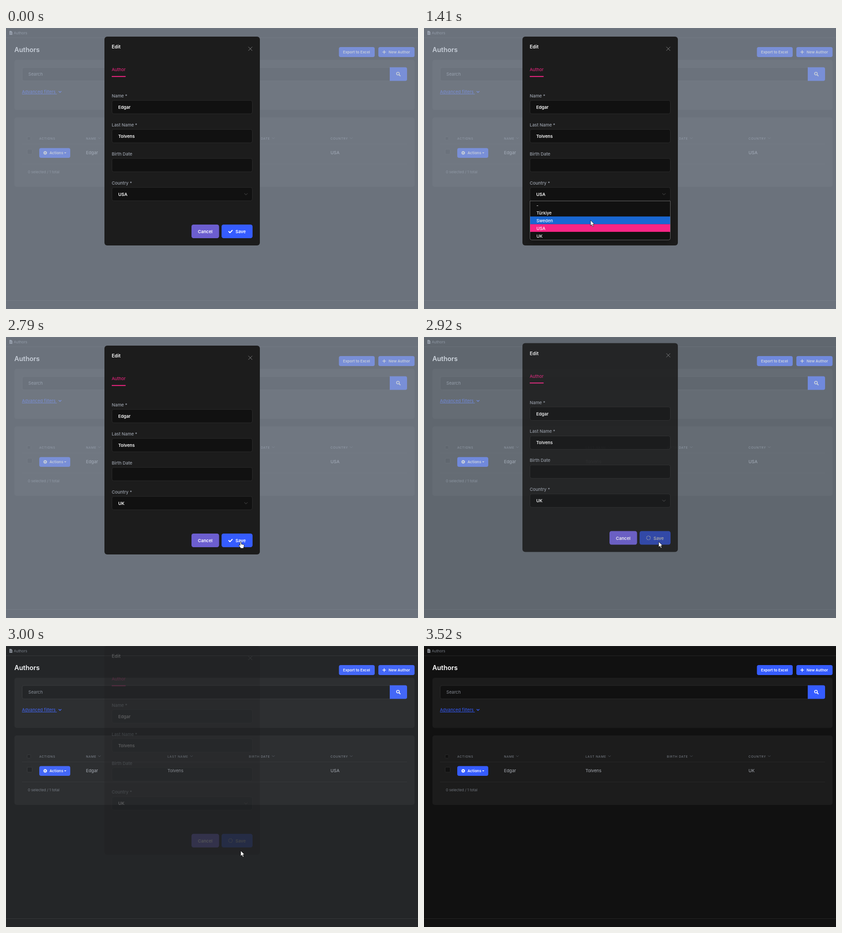
These frames come from a looping animation (904 by 619 pixels, 4.02 s). An HTML page:

```html
<!DOCTYPE html>
<html lang="en">
<head>
<meta charset="utf-8">
<title>Authors</title>
<style>
  html, body { margin: 0; height: 100%; overflow: hidden; background: #111; }
  svg { display: block; width: 904px; height: 619px; font: 9.55px Inter, sans-serif; cursor: default; }
  text { white-space: pre; }
  .line { fill: none; stroke: #262626; }
  .icon { fill: none; stroke-linecap: round; stroke-linejoin: round; }
  .semi { font-weight: 600; fill: #fff; }
  .small { font-size: 8.2px; }
  .head { font-size: 6.8px; letter-spacing: .7px; fill: #7d838c; }
  .label { font-weight: 500; fill: #9ba1ab; }
  .cell { fill: #a9adb5; }
  .list text { font-size: 9.4px; font-weight: 500; fill: #fff; }
</style>
</head>
<body>
<svg id="stage" viewBox="0 0 904 619"></svg>
<script>
const BLUE = '#355cff', PINK = '#f72585';
const LOOP = 4020, STEP = 40.8, PHASE = 143;
const OPEN = 1010, CLOSE = 1940, SAVING = 2870, FADE = 2902, REFRESH = 3160;
const CLICKS = [[920, 1010], [1820, 1900], [2790, 2870]];
const OPTIONS = ['-', 'Türkiye', 'Sweden', 'USA', 'UK'];
const LIST_TOP = 382, ROW = 17;

// Pointer path: time, x, y
const PATH = [
  [120, 772, 573], [280, 610, 480], [440, 470, 410], [560, 418, 390], [640, 403, 386],
  [700, 403, 386], [800, 402.5, 376], [880, 402.5, 372], [1080, 402.5, 372], [1220, 395, 384],
  [1410, 365, 424], [1530, 347, 452], [1610, 340, 461], [1960, 340, 461], [2060, 370, 458],
  [2230, 448, 448], [2310, 468, 446], [2450, 520, 443], [2550, 545, 446], [2650, 530, 450],
  [2750, 515, 451], [3040, 515, 451], [3200, 620, 500], [3420, 830, 599], [3500, 855, 625]
];

const rect = (x, y, w, h, fill, r = 0, more = '') =>
  `<rect x="${x}" y="${y}" width="${w}" height="${h}" rx="${r}" fill="${fill}" ${more}/>`;
const text = (x, y, str, cls = '', more = '') => `<text x="${x}" y="${y}" class="${cls}" ${more}>${str}</text>`;
const icon = (d, color, width = 1, more = '') =>
  `<path class="icon" d="${d}" stroke="${color}" stroke-width="${width}" ${more}/>`;
const hline = (x1, x2, y) => `<path class="line" d="M${x1} ${y}H${x2}"/>`;
const chevron = (x, y, w, color, width) => icon(`M${x} ${y}l${w / 2} ${w / 2}l${w / 2} ${-w / 2}`, color, width);
const box = (x, y, w, h, r) => rect(x, y, w, h, '#111', r, 'stroke="#2a2a2a"');

const column = ([x, name, arrow]) =>
  text(x, 245.5, name, 'head') + (arrow ? chevron(arrow, 241.5, 5, '#555b63', .8) : '');

const page = `
  ${rect(0, 0, 904, 619, '#111')}
  ${hline(0, 904, .5)}${hline(0, 904, 21.5)}${hline(0, 904, 600.5)}
  <path d="M7.5 6.5h4l2.5 2.5v6h-6.5z" fill="#8b9098"/>
  ${icon('M9 10.5h3.5M9 12.5h3.5', '#222', .7)}
  ${text(17, 13.8, 'Authors', '', 'font-size="8" fill="#777d86"')}
  ${text(18.3, 52.6, 'Authors', 'semi', 'font-size="14.4"')}
  ${rect(730.5, 42, 78.5, 22, BLUE, 4)}${text(739.5, 56, 'Export to Excel', 'semi small')}
  ${rect(817, 42, 79.5, 22, BLUE, 4)}${icon('M826.5 53h6.5M829.75 49.75v6.5', '#fff', 1.5)}
  ${text(839.5, 56, 'New Author', 'semi small')}
  ${rect(18.5, 70, 878, 110.5, '#1c1c1c', 5)}
  ${box(35.5, 87, 812, 29.5, 4)}
  ${text(49, 105, 'Search', '', 'fill="#858a92"')}
  <path d="M842 86.5h34a4 4 0 0 1 4 4v22a4 4 0 0 1-4 4h-34z" fill="${BLUE}"/>
  <circle cx="860" cy="100.5" r="3" fill="none" stroke="#fff" stroke-width="1.6"/>
  ${icon('M862.5 103l2.5 2.5', '#fff', 1.8)}
  ${text(35, 144, 'Advanced filters ', '', `fill="${BLUE}" text-decoration="underline"`)}
  ${chevron(116, 139.5, 5, BLUE, 1.5)}
  ${rect(18.5, 197, 878, 153, '#1c1c1c', 5)}
  ${box(46.5, 239.5, 7.5, 7.5, 1.5)}${box(46.5, 267, 11, 11, 2)}
  ${[[73, 'ACTIONS'], [175.5, 'NAME', 202.5], [354.3, 'LAST NAME', 404.5],
     [533, 'BIRTH DATE', 584], [712, 'COUNTRY', 755]].map(column).join('')}
  ${hline(35, 880, 255.5)}${hline(35, 880, 299.5)}
  ${rect(73, 264.5, 68, 21.5, BLUE, 4)}
  <circle cx="86" cy="275" r="2.3" fill="none" stroke="#fff" stroke-width="1.9"/>
  <circle cx="86" cy="275" r="3.6" fill="none" stroke="#fff" stroke-width="1.1" stroke-dasharray="1.6 1.23"/>
  ${text(95.5, 278, 'Actions', 'semi small')}
  <path d="M127.5 274h5l-2.5 2.5z" fill="#fff"/>
  ${text(175.5, 278, 'Edgar', 'cell')}${text(354.3, 278, 'Tolvens', 'cell')}
  ${text(712, 278, 'USA', 'cell', 'id="country"')}
  ${text(48, 319.5, '0 selected / 1 total', '', 'font-size="8.05" fill="#70757d"')}`;

const field = ([label, value], i) => {
  const y = 63.9 * i;
  return text(232, 153 + y, label, 'label') + box(232.5, 159.5 + y, 308, 29.5, 4) +
    text(246.3, 178 + y, value, 'semi', i === 3 ? 'id="choice"' : '');
};

const modal = `
  ${rect(216, 19, 341, 460, '#1c1c1c', 6)}
  ${text(232, 45, 'Edit', 'semi', 'font-size="10.5"')}
  ${icon('M532 41.8l8 8m0-8l-8 8', '#858585', 1)}
  ${text(232, 95, 'Author', '', `fill="${PINK}"`)}${rect(232, 105.8, 30.5, 2, PINK)}
  ${[['Name *', 'Edgar'], ['Last Name *', 'Tolvens'], ['Birth Date', ''], ['Country *', 'USA']].map(field).join('')}
  ${chevron(523.3, 364.5, 6.4, '#555', 1)}
  ${rect(407, 433, 60.5, 30, '#6c5ecf', 4.5)}${text(421, 452, 'Cancel', 'semi')}
  <g id="save">
    ${rect(473, 433, 68, 30, BLUE, 4.5)}${text(503.5, 452, 'Save', 'semi')}
    ${icon('M488.8 448.3l2.6 2.7l5-5.3', '#fff', 2, 'id="check"')}
    <circle id="spinner" cx="492.5" cy="448" r="4.2" fill="none" stroke="#fff" stroke-width="1.4" stroke-dasharray="1.8 1.5"/>
  </g>`;

const list = `
  ${rect(233, 383, 307, 84, '#111', 4, 'style="filter:drop-shadow(0 6px 5px #0004)"')}
  ${OPTIONS.map((name, i) => {
    const y = LIST_TOP + ROW * i - .8;
    return rect(233, y, 307, ROW, '#111', i === 4 ? 4 : 0, 'class="option"') + text(246.7, y + 12.4, name);
  }).join('')}
  <path d="M232.5 381H540.5V463a4 4 0 0 1-4 4H236.500a4 4 0 0 1-4-4z" fill="none" stroke="#666"/>`;

document.getElementById('stage').innerHTML = `
  ${page}
  ${rect(0, 0, 904, 619, 'rgb(163,175,190)', 0, 'id="backdrop"')}
  <g id="modal">${modal}</g>
  <g id="list" class="list">${list}</g>
  <g id="pointer">
    <circle id="click" cx="-.5" cy="0" r="8.3" fill="#ff0" fill-opacity=".53"/>
    <path id="arrow" d="M0 0v12l2.800-2.600l2 4.500l2-.9l-2-4.400h3.700z" fill="#fff" stroke="#000" stroke-width=".7"/>
    <path id="hand" d="M-1.300 1q1.300-2 2.600 0v4.200l5.200 1.100q1.200.4 1.100 1.800l-.8 3.900l-1.100 2.500h-5.700l-1.600-2.800l-2.700-3.500q0-1.500 1.500-1.200l1.500 1.200z"
      fill="#fff" stroke="#000" stroke-width=".8" stroke-linejoin="round"/>
  </g>`;

const el = Object.fromEntries([...document.querySelectorAll('[id]')].map(e => [e.id, e]));
const options = [...document.querySelectorAll('.option')];
const show = (e, on) => e.setAttribute('visibility', on ? 'inherit' : 'hidden');
const clamp = v => Math.min(1, Math.max(0, v));
const inside = (x, y, left, right) => x >= left && x <= right && y >= 433 && y <= 463;

function pointerAt(t) {
  const i = Math.max(1, PATH.findIndex(p => p[0] > t));
  const [t0, x0, y0] = PATH[i - 1], [t1, x1, y1] = PATH[i];
  const k = clamp((t - t0) / (t1 - t0));
  return [x0 + (x1 - x0) * k, y0 + (y1 - y0) * k];
}

function draw(time) {
  const t = PHASE + STEP * Math.floor((time - PHASE) / STEP);
  const alpha = clamp(1 - (t - FADE) / 123);
  const saving = t >= SAVING;
  const [x, y] = pointerAt(t);

  el.backdrop.setAttribute('opacity', .62 * alpha);
  el.modal.setAttribute('opacity', alpha);
  el.modal.setAttribute('transform', `translate(0 ${-Math.max(0, (t - 2885) * .169)})`);
  el.choice.textContent = t < CLOSE ? 'USA' : 'UK';
  el.country.textContent = t < REFRESH ? 'USA' : 'UK';

  el.save.setAttribute('opacity', saving ? .65 : 1);
  show(el.check, !saving);
  show(el.spinner, saving);
  el.spinner.setAttribute('transform', `rotate(${t * .36} 492.5 448)`);

  show(el.list, t >= OPEN && t < CLOSE);
  const hovered = Math.floor((y - LIST_TOP) / ROW);
  options.forEach((o, i) => o.setAttribute('fill', i === 3 ? PINK : i === hovered ? '#1967d2' : '#111'));

  const overButton = t > CLOSE && !saving && (inside(x, y, 407, 467.5) || inside(x, y, 473, 541));
  show(el.pointer, time >= 120 && t < 3500);
  el.pointer.setAttribute('transform', `translate(${x} ${y})`);
  show(el.click, CLICKS.some(([a, b]) => t >= a && t < b));
  show(el.arrow, !overButton);
  show(el.hand, overButton);
}

const start = performance.now();
(function tick() {
  draw((performance.now() - start) % LOOP);
  requestAnimationFrame(tick);
})();
</script>
</body>
</html>
```
